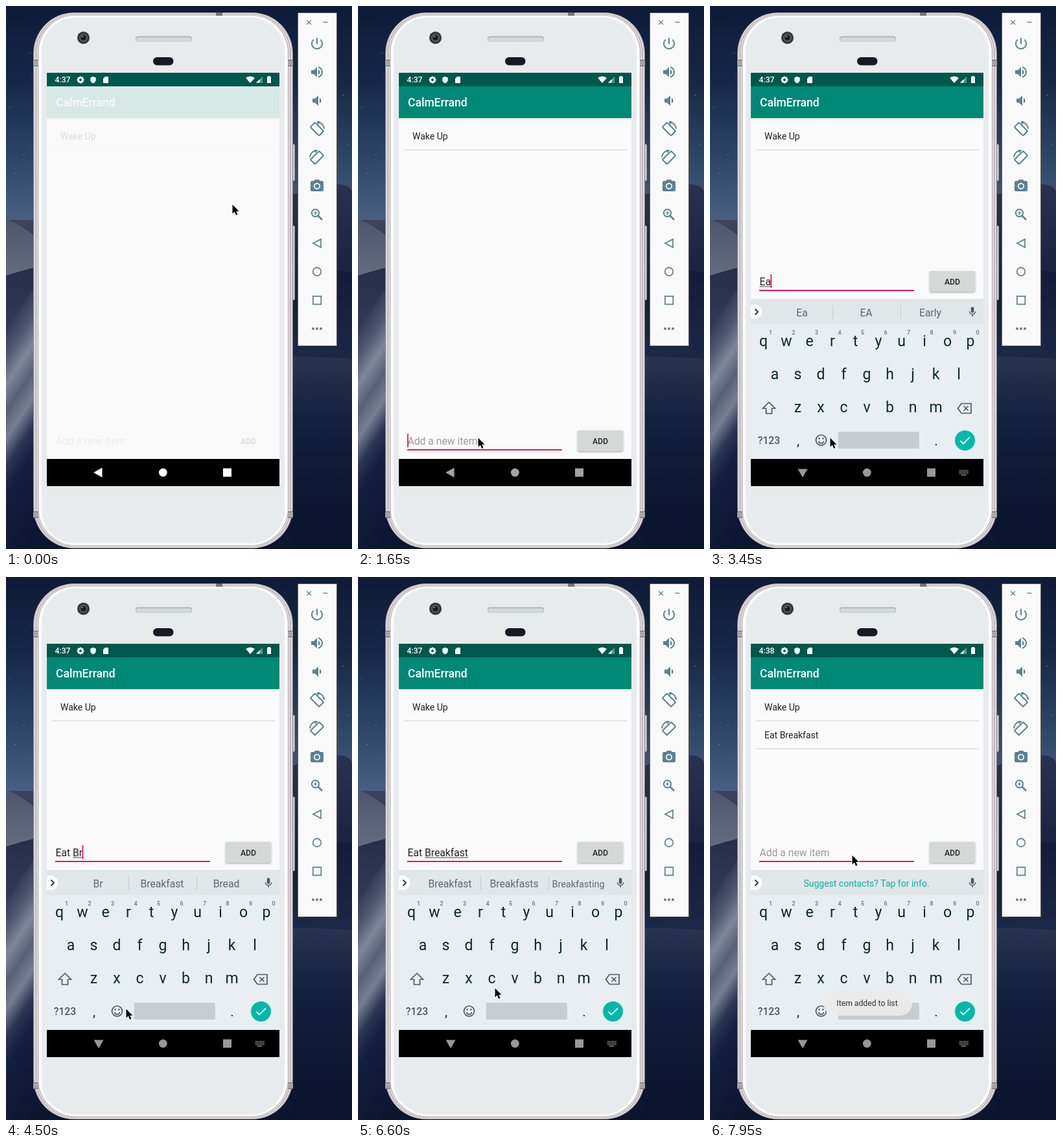
Recreate the animation shown at these times as an HTML page with a canvas. Size 534 by 838 pixels, loop 8000 ms.

```html
<!DOCTYPE html>
<html lang="en">
<head>
<meta charset="utf-8">
<title>To-do app demo</title>
<style>
html, body { margin: 0; width: 100%; height: 100%; overflow: hidden; background: #0d1832; }
canvas { display: block; }
</style>
</head>
<body>
<canvas id="stage" width="534" height="838"></canvas>
<script>
const ctx = document.getElementById('stage').getContext('2d');
const LOOP = 8000, TICK = 150;
const ACCENT = '#d81b60', ICON = '#5a8292', KEY = '#0b2831', KEY_ICON = '#4b5b62';

// Icon outlines on a 24 unit grid
const icons = {
  power: 'M13 3h-2v10h2V3zm4.83 2.17l-1.42 1.42C17.99 7.86 19 9.81 19 12c0 3.87-3.13 7-7 7s-7-3.13-7-7c0-2.19 1.01-4.14 2.58-5.42L6.17 5.17C4.23 6.82 3 9.26 3 12c0 4.97 4.03 9 9 9s9-4.03 9-9c0-2.74-1.23-5.18-3.17-6.83z',
  loud: 'M3 9v6h4l5 5V4L7 9H3zm13.5 3c0-1.77-1.02-3.29-2.5-4.03v8.05c1.48-.73 2.5-2.25 2.5-4.02zM14 3.23v2.06c2.89.86 5 3.54 5 6.71s-2.11 5.85-5 6.71v2.06c4.01-.91 7-4.49 7-8.77s-2.99-7.86-7-8.77z',
  quiet: 'M18.5 12c0-1.77-1.02-3.29-2.5-4.03v8.05c1.48-.73 2.5-2.25 2.5-4.02zM5 9v6h4l5 5V4L9 9H5z',
  camera: 'M9 2L7.17 4H4c-1.1 0-2 .9-2 2v12c0 1.1.9 2 2 2h16c1.1 0 2-.9 2-2V6c0-1.1-.9-2-2-2h-3.17L15 2H9zm3 15c-2.76 0-5-2.24-5-5s2.24-5 5-5 5 2.24 5 5-2.24 5-5 5z',
  mic: 'M12 14c1.66 0 3-1.34 3-3V5c0-1.66-1.34-3-3-3S9 3.34 9 5v6c0 1.66 1.34 3 3 3zm5.3-3c0 3-2.54 5.1-5.3 5.1S6.7 14 6.7 11H5c0 3.41 2.72 6.23 6 6.72V21h2v-3.28c3.28-.48 6-3.3 6-6.72h-1.7z',
  shield: 'M12 1L3 5v6c0 5.55 3.84 10.74 9 12 5.16-1.26 9-6.45 9-12V5z',
  card: 'M18 2h-8L4 8v12c0 1.1.9 2 2 2h12c1.1 0 2-.9 2-2V4c0-1.1-.9-2-2-2z',
};

// [time, text, underline start or -1, suggestions]
const typing = [
  [0, '', -1, null],
  [2100, 'E', -1, []],
  [2400, 'Es', -1, []],
  [2850, 'Es', 0, ['Es', 'Essay', 'Easy']],
  [3000, 'E', 0, ['Es', 'Essay', 'Easy']],
  [3150, 'E', 0, ['E', 'Eat', 'Every']],
  [3450, 'Ea', 0, ['Ea', 'EA', 'Early']],
  [3750, 'Eat', 0, ['Eat', 'Eats', 'East']],
  [3900, 'Eat ', -1, ['and', 'the', 'something']],
  [4200, 'Eat B', 4, ['B', 'Be', 'But']],
  [4500, 'Eat Br', 4, ['Br', 'Breakfast', 'Bread']],
  [4650, 'Eat Bre', 4, ['Bre', 'Breakfast', 'Bread']],
  [4800, 'Eat Brea', 4, ['Brea', 'Bread', 'Breakfast']],
  [4950, 'Eat Break', 4, ['Break', 'Bread', 'Breakfast']],
  [5400, 'Eat Breakf', 4, ['Breakf', 'Breakfast', 'Breakfasts']],
  [5550, 'Eat Breakfa', 4, ['Breakf', 'Breakfast', 'Breakfasts']],
  [5700, 'Eat Breakfa', 4, ['Breakfa', 'Breakfast', 'Breakfasts']],
  [6000, 'Eat Breakfas', 4, ['Breakfas', 'Breakfast', 'Breakfasts']],
  [6150, 'Eat Breakfast', 4, ['Breakfast', 'Breakfasts', 'Breakfasting']],
  [7650, '', -1, null],
];

const pointerPath = [
  [0, 349.5, 306.5], [150, 346, 318], [600, 275, 470], [1050, 200, 636], [1350, 185.5, 666.5],
  [6450, 185.5, 666.5], [6600, 211.5, 634.5], [6900, 295, 510], [7200, 346, 430],
  [7500, 346, 430], [7800, 246, 424], [7950, 219.5, 429.5],
];

function pointerAt(t) {
  const i = pointerPath.findIndex(p => p[0] > t);
  if (i < 0) return pointerPath.at(-1).slice(1);
  const [t0, x0, y0] = pointerPath[i - 1], [t1, x1, y1] = pointerPath[i];
  const k = (t - t0) / (t1 - t0);
  return [x0 + (x1 - x0) * k, y0 + (y1 - y0) * k];
}

function box(x, y, w, h, fill, r = 0) {
  ctx.fillStyle = fill;
  ctx.beginPath();
  ctx.roundRect(x, y, w, h, r);
  ctx.fill();
}

function disc(x, y, r, fill) {
  ctx.fillStyle = fill;
  ctx.beginPath();
  ctx.arc(x, y, r, 0, Math.PI * 2);
  ctx.fill();
}

function ring(x, y, r, color, width) {
  ctx.strokeStyle = color;
  ctx.lineWidth = width;
  ctx.beginPath();
  ctx.arc(x, y, r, 0, Math.PI * 2);
  ctx.stroke();
}

function trace(points, closed) {
  ctx.beginPath();
  points.forEach(([x, y]) => ctx.lineTo(x, y));
  if (closed) ctx.closePath();
}

function poly(points, fill) {
  trace(points, true);
  ctx.fillStyle = fill;
  ctx.fill();
}

function line(points, color, width, closed = false) {
  trace(points, closed);
  ctx.strokeStyle = color;
  ctx.lineWidth = width;
  ctx.stroke();
}

function text(str, x, y, size, color, weight = 400, align = 'left') {
  ctx.font = `${weight} ${size}px Roboto, sans-serif`;
  ctx.fillStyle = color;
  ctx.textAlign = align;
  ctx.fillText(str, x, y);
}

function icon(name, x, y, size, color) {
  ctx.save();
  ctx.translate(x - size / 2, y - size / 2);
  ctx.scale(size / 24, size / 24);
  ctx.fillStyle = color;
  ctx.fill(new Path2D(icons[name]));
  ctx.restore();
}

function gradient(y0, y1, ...colors) {
  const g = ctx.createLinearGradient(0, y0, 0, y1);
  colors.forEach((c, i) => g.addColorStop(i / (colors.length - 1), c));
  return g;
}

function shape(path, fill) {
  ctx.fillStyle = fill;
  ctx.fill(new Path2D(path));
}

function drawWallpaper() {
  box(0, 0, 534, 340, gradient(0, 340, '#0e1b37', '#152747', '#2b4466', '#4a6384'));
  box(0, 330, 534, 508, gradient(330, 838, '#3c435c', '#202b4b', '#111d3b', '#0b152e'));
  shape('M0 328Q25 338 50 360V420H0z', gradient(328, 420, '#4c546d', '#686d81'));
  shape('M0 416Q25 408 50 402V560H0z', gradient(402, 560, '#262e4a', '#3a4262'));
  // Lit dune slopes rising to the right
  ctx.save();
  ctx.transform(1, -1.5, 0, 1, 0, 0);
  box(0, 500, 50, 420, gradient(500, 920, '#343c5a', '#4f5771', '#80869a', '#586079',
    '#777e92', '#2b3655', '#14203f', '#111c3a', '#0f1936', '#0d1733', '#0b152f'));
  ctx.restore();
  shape('M440 292Q490 274 512 275T534 290V838H440z', gradient(275, 838, '#29324f', '#172341', '#17233f', '#0d1835', '#091329'));
  shape('M440 430Q490 400 534 412V545H440z', gradient(405, 545, '#111c39', '#1c2848'));
  shape('M440 541Q490 541 534 545V838H440z', gradient(541, 838, '#27334f', '#142040', '#0d1835', '#0a142e'));
  for (const [x, y] of [[5, 156], [27, 229], [14, 258], [36, 72], [520, 137], [527, 213]])
    box(x, y, 1, 1, '#9aaabd');
}

function drawPhone() {
  for (const [y, h] of [[213, 57], [339, 115]]) {
    box(441, y, 5, h, '#a59fa4', 2);
    box(442, y + 1, 2.5, h - 2, '#e4dde0', 1);
  }
  // Nested shells: inset from the outline and colour
  const shells = [[0, '#8d878c'], [1, '#ddd3d5'], [4, '#a69fa3'], [5, '#eae2e4'], [7, '#a59da1'], [8, '#fafbfb'], [13, '#e8ebec']];
  for (const [inset, color] of shells) {
    const top = inset * 0.6;
    box(42 + inset, 10 + top, 401 - inset * 2, 827 - top * 2, color, 63 - inset * 0.8);
  }
  for (const y of [83, 780]) {
    for (const x of [42, 435]) {
      box(x, y, 8, 10, '#aaa3a7');
      box(x, y, 8, 1, '#716b70');
      box(x, y + 9, 8, 1, '#716b70');
    }
  }
  box(324, 10, 10, 5, '#777177');
  disc(119.5, 49, 9.5, '#333538');
  disc(119.5, 49, 6.5, '#55585b');
  disc(119.5, 49, 4, '#18191e');
  disc(118, 47, 1.3, '#747b80');
  box(200, 46.5, 87, 8.5, '#b0b6b7', 3.5);
  box(201, 48.5, 85, 6, '#d4d9d9', 3);
  box(227, 79, 31.5, 12.5, '#181922', 6.2);
}

function drawRotate(y, side) {
  ctx.save();
  ctx.translate(480, y);
  ctx.scale(side, 1);
  ctx.rotate(Math.PI / 4);
  ctx.strokeStyle = ICON;
  ctx.lineWidth = 2;
  ctx.beginPath();
  ctx.roundRect(-9.5, -5, 19, 10, 1);
  ctx.stroke();
  ctx.restore();
  ctx.save();
  ctx.translate(480, y);
  ctx.scale(side, 1);
  ctx.lineWidth = 1.8;
  ctx.beginPath();
  ctx.arc(0, 0, 11, -1.55, -0.05);
  ctx.strokeStyle = ICON;
  ctx.stroke();
  poly([[-1, -12], [5, -11.5], [2, -7]], ICON);
  ctx.restore();
}

function drawSidebar() {
  box(450, 10, 61, 515, '#65635f');
  box(451, 11, 59, 513, '#f9f9f9');
  line([[464.5, 22], [471, 28.5]], ICON, 1.3);
  line([[471, 22], [464.5, 28.5]], ICON, 1.3);
  line([[489, 25], [496.5, 25]], ICON, 1.3);
  icon('power', 480, 58, 24, ICON);
  icon('loud', 480, 102, 24, ICON);
  icon('quiet', 480, 146, 24, ICON);
  drawRotate(190, 1);
  drawRotate(234, -1);
  icon('camera', 480, 278, 24, ICON);
  disc(480, 278, 3.2, ICON);
  ring(477.5, 319.5, 5.7, ICON, 1.9);
  line([[481.5, 323.5], [488, 330]], ICON, 2.5);
  line([[474.5, 319.5], [480.5, 319.5]], ICON, 1.2);
  line([[477.5, 316.5], [477.5, 322.5]], ICON, 1.2);
  line([[474, 366], [486, 360], [486, 372.5]], ICON, 1.7, true);
  ring(480, 410, 6.3, ICON, 1.7);
  line([[473.8, 447.8], [486.3, 447.8], [486.3, 460.3], [473.8, 460.3]], ICON, 1.7, true);
  for (const x of [474, 480, 486]) disc(x, 498, 2, ICON);
}

function drawStatusBar(t) {
  box(63, 103, 359, 21, '#00574b');
  text(t < 6900 ? '4:37' : '4:38', 75.5, 118, 12.2, '#fff', 500);
  for (let i = 0; i < 8; i++) {
    ctx.save();
    ctx.translate(115, 114);
    ctx.rotate(i * Math.PI / 4);
    box(-1.3, -5.5, 2.6, 3, '#fff');
    ctx.restore();
  }
  ring(115, 114, 3.1, '#fff', 2.2);
  icon('shield', 134.5, 114, 11.5, '#fff');
  icon('card', 154, 114, 12, '#fff');
  ctx.fillStyle = '#fff';
  ctx.beginPath();
  ctx.moveTo(377, 119);
  ctx.arc(377, 119, 10.5, -Math.PI * 0.73, -Math.PI * 0.27);
  ctx.fill();
  poly([[386, 118.5], [396, 118.5], [396, 108.5]], '#5f938b');
  poly([[386, 118.5], [391.5, 118.5], [391.5, 113]], '#fff');
  box(403, 109, 6, 10, '#fff', 0.7);
  box(404.5, 108, 3, 2, '#fff');
}

function drawListItem(label, y) {
  text(label, 84, y + 33, 14, '#212121');
  box(70, y + 48, 345, 2, '#e5e5e5');
}

function caretVisible(t) {
  if (t < 1500) return t >= 450 && t < 1050;
  return !(t >= 6600 && t < 7050) && t < 7950;
}

function drawInput(t, dy, [, value, underline]) {
  const size = 15.7, base = 431 + dy;
  text(value || 'Add a new item', 76.5, base, size, value ? '#212121' : '#9b9b9b');
  const width = s => ctx.measureText(s).width;
  if (underline >= 0) {
    const from = width(value.slice(0, underline));
    box(76.5 + from, base + 1.5, width(value) - from, 1, '#424242');
  }
  if (caretVisible(t)) box(76 + width(value), 414 + dy, 1.8, 21, ACCENT);
  if (t >= TICK) {
    box(76, 438 + dy, 239, 2, ACCENT);
    ctx.save();
    ctx.shadowColor = 'rgba(0,0,0,.32)';
    ctx.shadowBlur = 3;
    ctx.shadowOffsetY = 1.3;
    box(339, 409 + dy, 70, 32, t === 7500 ? '#bfc1c1' : '#d6d7d7', 1.7);
    ctx.restore();
  }
  text('ADD', 374, 430 + dy, 12.2, '#212121', 500, 'center');
}

function drawSuggestions(words) {
  box(63, 452, 359, 39, '#e1e6e9');
  box(56, 461, 24.5, 22, '#fff', 11);
  line([[69.5, 467.5], [74, 472], [69.5, 476.5]], '#263238', 1.8);
  icon('mic', 405, 472, 18.5, KEY_ICON);
  if (!words) {
    text('Suggest contacts? Tap for info.', 241.5, 478, 14, '#00b5a5', 400, 'center');
    return;
  }
  for (const x of [189, 294]) box(x, 462, 1, 21, '#c4ccd0');
  words.forEach((word, i) =>
    text(word, 142 + 99 * i, 478.5, word.length > 11 ? 14.4 : 15.7, '#5b6a71', 400, 'center'));
}

function drawKeyboard(words, dy) {
  ctx.save();
  ctx.beginPath();
  ctx.rect(63, 103, 359, 596);
  ctx.clip();
  ctx.translate(0, dy);
  box(63, 452, 359, 247, '#e8eef1');
  drawSuggestions(words);
  const rows = [['qwertyuiop', 82.5, 525], ['asdfghjkl', 100, 576], ['zxcvbnm', 135.5, 627]];
  for (const [letters, x, y] of rows)
    [...letters].forEach((c, i) => text(c, x + 35.5 * i, y, 23, KEY, 400, 'center'));
  for (let i = 0; i < 10; i++)
    text((i + 1) % 10, 93.5 + 35.5 * i, 507, 9, '#66757c', 500, 'center');
  line([[91, 611.5], [81.5, 621], [86.5, 621], [86.5, 629], [95.5, 629], [95.5, 621], [100.5, 621]], KEY_ICON, 1.7, true);
  line([[382.5, 621], [388, 613.5], [403, 613.5], [403, 628.5], [388, 628.5]], KEY_ICON, 1.7, true);
  line([[391.5, 617.5], [398.5, 624.5]], KEY_ICON, 1.7);
  line([[398.5, 617.5], [391.5, 624.5]], KEY_ICON, 1.7);
  text('?123', 91, 675.5, 15.7, KEY_ICON, 500, 'center');
  text(',', 136, 678, 21, KEY, 400, 'center');
  text('.', 349, 678, 21, KEY, 400, 'center');
  ring(171.5, 670, 8, KEY_ICON, 1.7);
  disc(168.6, 667.5, 1.3, KEY_ICON);
  disc(174.4, 667.5, 1.3, KEY_ICON);
  ctx.beginPath();
  ctx.arc(171.5, 671, 4, 0.15, Math.PI - 0.15);
  ctx.stroke();
  box(197.5, 657, 125.5, 26, '#c8cdd1', 2.5);
  disc(393.5, 670.5, 15.5, '#00b9aa');
  line([[386.5, 671], [391, 675.5], [401, 665.5]], '#fff', 1.9);
  ctx.restore();
}

function drawNavBar(t, keyboard) {
  const dim = Math.min(1, Math.max(0, (t - 450) / 900));
  const level = Math.round(255 - 93 * dim - (keyboard ? 10 : 0));
  const color = `rgb(${level},${level},${level})`;
  box(63, 699, 359, 42, '#000');
  poly(keyboard ? [[135.5, 714.5], [150.5, 714.5], [143, 727.5]] : [[135, 720], [148.5, 712.5], [148.5, 727.5]], color);
  disc(242.3, 720, 6.4, color);
  box(335, 713.5, 13, 13, color, 0.7);
  if (!keyboard) return;
  for (let row = 0; row < 3; row++)
    for (let col = 0; col < 6; col++)
      box(385 + col * 2.4, 716 + row * 2.4, 1.5, 1.5, color);
  box(387.5, 723.2, 8, 1.3, color);
}

function drawToast(alpha) {
  ctx.save();
  ctx.globalAlpha = alpha;
  box(175, 639, 137, 38, '#ebebeb', 19);
  text('Item added to list', 242.5, 662, 12.2, '#292929', 400, 'center');
  ctx.restore();
}

function drawPointer(x, y) {
  const p = [[0, 0], [0, 14], [3.3, 11], [5.6, 16.4], [8, 15.3], [5.7, 10.2], [10, 10.2]]
    .map(([dx, dy]) => [x + dx, y + dy]);
  ctx.lineJoin = 'round';
  line(p, '#fff', 2, true);
  poly(p, '#000');
  ctx.lineJoin = 'miter';
}

function draw(t) {
  const keyboard = t >= 1800;
  const entry = typing.findLast(e => e[0] <= t);
  drawWallpaper();
  drawPhone();
  drawSidebar();

  box(63, 103, 359, 638, '#fafafa');
  box(63, 173, 359, 4, gradient(173, 177, '#e6e6e6', '#fafafa'));
  box(63, 124, 359, 49, '#008876');
  text('CalmErrand', 77, 155, 17.5, '#fff', 500);
  drawListItem('Wake Up', 173);
  if (t >= 7650) drawListItem('Eat Breakfast', 216);
  drawInput(t, keyboard ? 0 : 246, entry);
  if (t < 300) {
    ctx.globalAlpha = t < 150 ? 0.86 : 0.25;
    box(63, 124, 359, 575, '#fafafa');
    ctx.globalAlpha = 1;
  }
  if (keyboard) drawKeyboard(entry[3], t < 1950 ? 110 : 0);
  drawStatusBar(t);
  drawNavBar(t, keyboard);
  if (t >= 7800) drawToast(t < 7950 ? 0.5 : 0.95);
  drawPointer(...pointerAt(t));
}

function frame(now) {
  draw(Math.floor((now % LOOP) / TICK) * TICK);
  requestAnimationFrame(frame);
}
requestAnimationFrame(frame);
</script>
</body>
</html>
```
